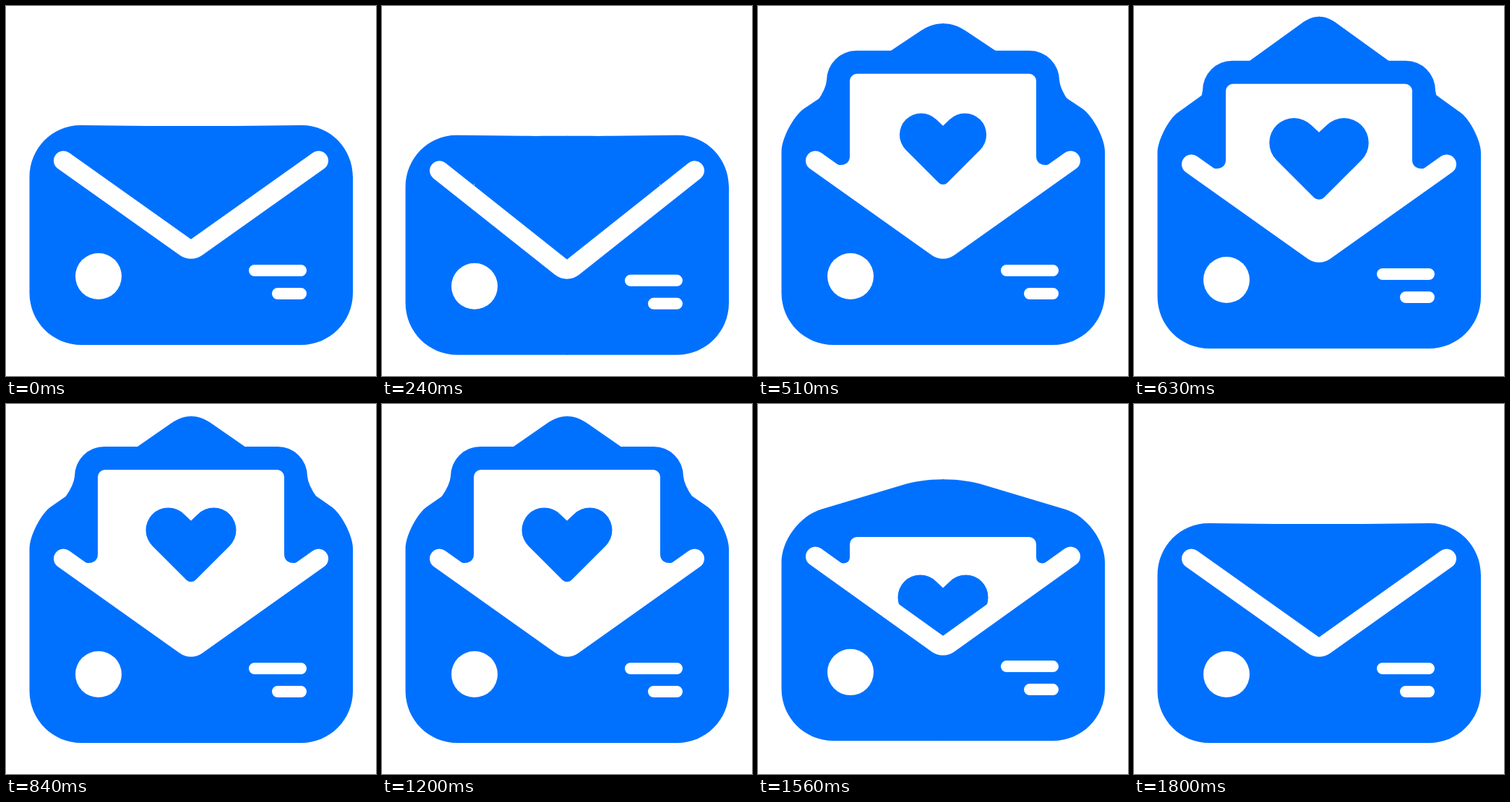
Recreate the animation shown at these times as an HTML page with a canvas. Size 512 px wide and 512 px high, loop 1830 ms.

```html
<!DOCTYPE html>
<html lang="en">
<head>
<meta charset="utf-8">
<title>Envelope</title>
<style>
html, body { margin: 0; width: 100%; height: 100%; overflow: hidden; background: #fff; }
canvas { display: block; width: 512px; height: 512px; }
</style>
</head>
<body>
<canvas id="stage" width="512" height="512"></canvas>
<script>
const ctx = document.getElementById('stage').getContext('2d');
const BLUE = '#0071ff', WHITE = '#fff';
const LOOP = 1830, STEP = 30, CLOSE = 1200;

const lerp = (a, b, u) => a + (b - a) * u;
const clamp = u => Math.min(1, Math.max(0, u));
const progress = (t, from, length) => clamp((t - from) / length);

// Smooth bump of height 1 around a moment.
const hump = (t, peak) => Math.cos(Math.PI / 2 * Math.min(1, Math.abs(t - peak) / 110)) ** 2;

// Ease out past the end and back again.
function backOut(u, overshoot) {
  const w = 1 - u;
  return 1 - (overshoot + 1) * w ** 3 + overshoot * w * w;
}

// Dip, jump and settle while opening; lift and land while closing.
const shiftAt = t => 15 * hump(t, 220) - 25 * hump(t, 390) + 5 * hump(t, 630)
  - 5 * hump(t, 1560) + 12 * hump(t, 1640);

const foldAt = t => 339.4 + 15 * hump(t, 230) + 5 * hump(t, 1640);

const flapAt = t => backOut(progress(t, 285, 560), 1.15) * (1 - progress(t, CLOSE, 463) ** 2);

const letterAt = t => 91 + 249 * (1 - progress(t, 270, 310)) ** 3
  + 11.7 * hump(t, 630) + 249 * progress(t, CLOSE, 457) ** 4;

const heartAt = t => backOut(progress(t, 343, 495), 1.7);

function fill(color, draw) {
  ctx.fillStyle = color;
  ctx.beginPath();
  draw();
  ctx.fill();
}

// Runs a drawing for the left half, then mirrored for the right half.
function bothSides(draw, width = 512) {
  draw();
  ctx.save();
  ctx.translate(width, 0);
  ctx.scale(-1, 1);
  draw();
  ctx.restore();
}

// The back flap grows out of the body's top edge as p goes from 0 to 1.
function halfBody(p) {
  const side = lerp(237, 200, p), apex = 166 - 149 * p;
  const cx = lerp(104, 62, p), cy = 165 - 24 * Math.sin(1.9 * p);
  const kx = 195 + 33 * p * p, ky = 166 - 139 * p + 16 * p * (1 - p);
  const slope = (ky - cy) / (kx - cx), reach = lerp(40, 16, p) / Math.hypot(1, slope);
  const bend = .28 * (256 - kx);
  ctx.moveTo(257, 469);
  ctx.lineTo(104.5, 469);
  ctx.bezierCurveTo(64.5, 469, 32.5, 437, 32.5, 397);
  ctx.lineTo(32.5, side);
  ctx.bezierCurveTo(32.5, side - lerp(40, 18, p), cx - reach, cy - reach * slope, cx, cy);
  ctx.lineTo(kx, ky);
  ctx.bezierCurveTo(kx + bend, ky + bend * slope, 256 - .4 * (256 - kx), apex, 256, apex);
  ctx.lineTo(257, apex);
}

function halfBorder(top) {
  ctx.moveTo(257, top - 32);
  ctx.lineTo(137, top - 32);
  ctx.arcTo(95, top - 32, 95, top + 9, 41);
  ctx.lineTo(95, top + 9);
  ctx.quadraticCurveTo(94, top + 21, 82, top + 38);
  ctx.lineTo(82, top + 60);
  ctx.lineTo(257, top + 60);
}

// Rounds the blue pocket between the letter's edge and the fold.
function hook(top) {
  const k = clamp((232 - top) / 64);
  const x = v => 127 + k * v, y = v => 231.5 + k * v;
  ctx.moveTo(x(-18), y(-12.8));
  ctx.bezierCurveTo(x(-14.5), y(-10.2), 127, y(-10.5), 127, y(-23.5));
  ctx.lineTo(128, 234);
  ctx.lineTo(127, 234);
}

function heart(y, scale) {
  const quarter = Math.PI / 4;
  ctx.save();
  ctx.translate(256, y);
  ctx.scale(scale, scale);
  fill(BLUE, () => {
    ctx.moveTo(0, -33.5);
    ctx.arc(31.5, -20.5, 31, -3 * quarter, quarter);
    ctx.arcTo(0, 54.8, -53.4, 1.4, 9);
    ctx.arc(-31.5, -20.5, 31, 3 * quarter, 7 * quarter);
  });
  ctx.restore();
}

function draw(t) {
  const top = letterAt(t), fold = foldAt(t);

  ctx.fillStyle = WHITE;
  ctx.fillRect(0, 0, 512, 512);
  ctx.save();
  ctx.translate(0, shiftAt(t));

  bothSides(() => fill(BLUE, () => halfBody(flapAt(t))), 512.5);
  bothSides(() => fill(BLUE, () => halfBorder(top)));

  // The letter shows only above the fold.
  ctx.save();
  ctx.beginPath();
  ctx.moveTo(79, -100);
  ctx.lineTo(79, 214);
  ctx.lineTo(256, fold);
  ctx.lineTo(433, 214);
  ctx.lineTo(433, -100);
  ctx.clip();
  fill(WHITE, () => ctx.roundRect(127, top, 258, 300, 10));
  bothSides(() => fill(WHITE, () => hook(top)));
  heart(top + 104, heartAt(t));
  ctx.restore();

  ctx.strokeStyle = WHITE;
  ctx.lineWidth = 27;
  ctx.lineCap = ctx.lineJoin = 'round';
  ctx.beginPath();
  ctx.moveTo(79.5, 214);
  ctx.arcTo(256, fold, 432.5, 214, 13.5);
  ctx.lineTo(432.5, 214);
  ctx.stroke();

  fill(WHITE, () => ctx.arc(128, 374, 32, 0, 2 * Math.PI));
  fill(WHITE, () => {
    ctx.roundRect(336, 358, 80, 16, 8);
    ctx.roundRect(368, 390, 48, 16, 8);
  });
  ctx.restore();
}

const start = performance.now();
function frame() {
  const t = (performance.now() - start) % LOOP;
  draw(Math.floor(t / STEP) * STEP);
  requestAnimationFrame(frame);
}
frame();
</script>
</body>
</html>
```
